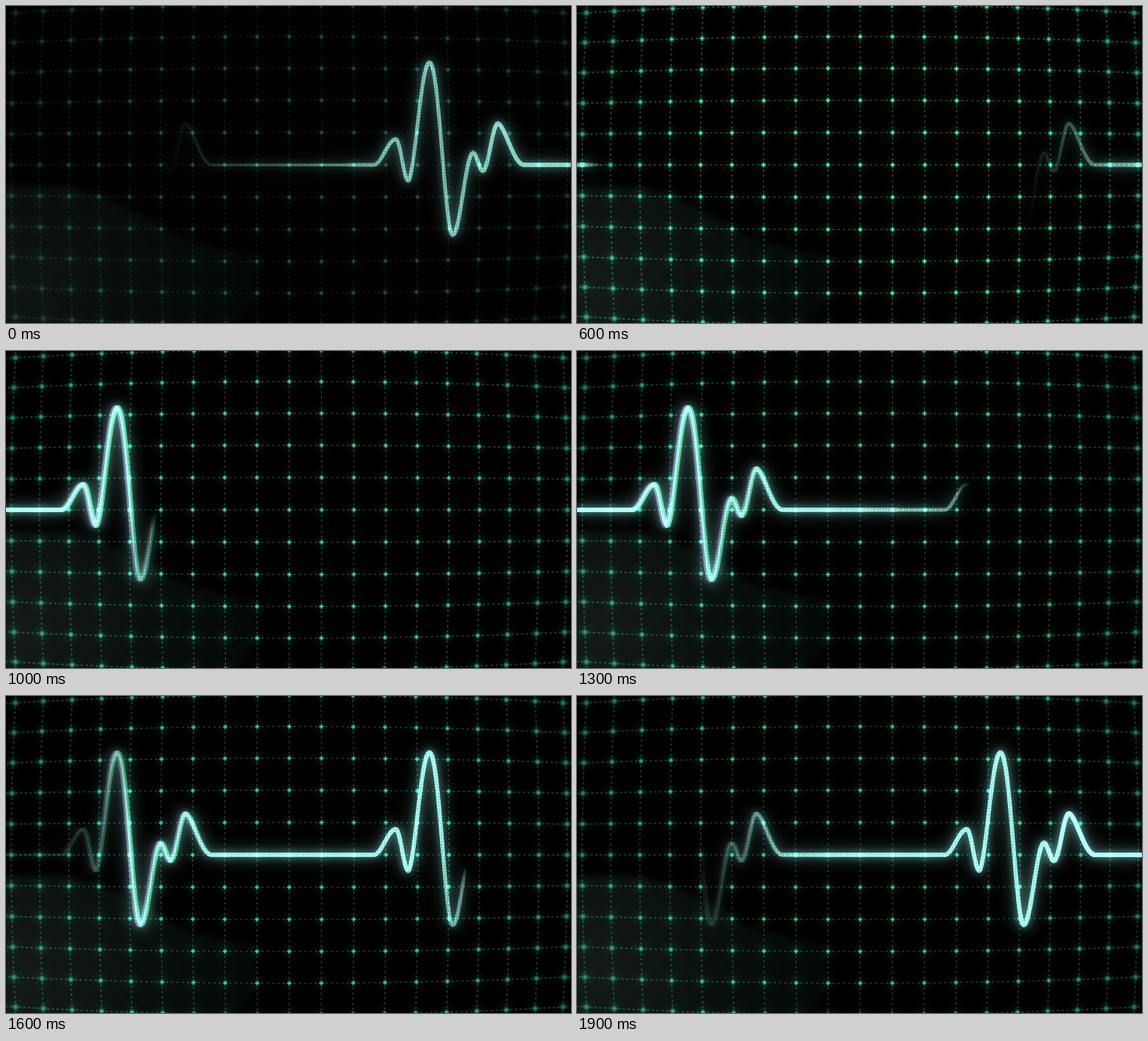
Animation, 750 px wide and 421 px high, one loop 2 s. Source, as an HTML page with a canvas:

```html
<!DOCTYPE html>
<html lang="en">
<head>
<meta charset="utf-8">
<title>Heartbeat monitor</title>
<style>
html, body { margin: 0; width: 100%; height: 100%; overflow: hidden; background: #000; }
canvas { display: block; width: 750px; height: 421px; }
</style>
</head>
<body>
<canvas id="stage" width="750" height="421"></canvas>
<script>
const W = 750, H = 421, CX = 376, CY = 211;
const LOOP = 2000, STEP = 100;
const clamp = (v, a = 0, b = 1) => Math.min(b, Math.max(a, v));

function layer() {
  const c = document.createElement('canvas');
  c.width = W;
  c.height = H;
  return c.getContext('2d');
}

// Linear interpolation through [time, value] pairs
function keyed(keys, t) {
  for (let i = 1; i < keys.length; i++) {
    const [t0, v0] = keys[i - 1], [t1, v1] = keys[i];
    if (t <= t1) return v0 + (v1 - v0) * clamp((t - t0) / (t1 - t0));
  }
  return keys[keys.length - 1][1];
}

// ---- Grid seen through a curved screen ----
const CELL = 43, BULGE = 3.1e-7;

function bend(n, m) {
  const u = n * CELL, v = m * CELL, f = 1 - BULGE * (u * u + v * v);
  return [CX + u * f, CY + v * f];
}

const softness = (x, y) => clamp((Math.hypot(x - CX, y - CY) - 190) / 210);

function spot(g, x, y, r, rgb, a) {
  const fill = g.createRadialGradient(x, y, 0, x, y, r);
  fill.addColorStop(0, `rgba(${rgb},${a})`);
  fill.addColorStop(0.4, `rgba(${rgb},${a * 0.7})`);
  fill.addColorStop(1, `rgba(${rgb},0)`);
  g.fillStyle = fill;
  g.fillRect(x - r, y - r, 2 * r, 2 * r);
}

function dash(g, n, m, vertical) {
  const [x, y] = bend(n, m), e = softness(x, y);
  const long = 3 + e * 0.6, wide = 1.5 + e * 1.1;
  g.fillStyle = `rgba(28,125,98,${0.78 - 0.3 * e})`;
  g.beginPath();
  g.ellipse(x, y, (vertical ? wide : long) / 2, (vertical ? long : wide) / 2, 0, 0, 7);
  g.fill();
}

function node(g, n, m) {
  const [x, y] = bend(n, m), e = softness(x, y);
  spot(g, x, y, 15, '16,110,84', 0.15);
  g.fillStyle = `rgba(36,190,145,${0.55 * (1 - e)})`;
  g.fillRect(x - 3.5, y - 0.7, 7, 1.4);
  g.fillRect(x - 0.7, y - 4, 1.4, 8);
  spot(g, x, y, 3.6 + 1.6 * e, '44,226,170', 0.88 - 0.18 * e);
}

function makeGrid() {
  const g = layer(), parts = 6;
  g.globalCompositeOperation = 'lighter';
  for (let n = -10; n <= 10; n++) {
    for (let m = -6; m <= 6; m++) {
      for (let k = 1; k < parts; k++) {
        dash(g, n + k / parts, m, false);
        dash(g, n, m + k / parts, true);
      }
      node(g, n, m);
    }
  }
  return g.canvas;
}

// ---- Faint reflection at the lower left ----
function makeHaze() {
  const g = layer();
  const fill = g.createRadialGradient(20, 370, 20, 20, 370, 340);
  fill.addColorStop(0, 'rgb(18,25,24)');
  fill.addColorStop(0.4, 'rgb(10,17,16)');
  fill.addColorStop(0.8, 'rgb(4,10,9)');
  fill.addColorStop(1, 'rgb(2,6,6)');
  const edge = [[0, 238], [85, 240], [130, 254], [190, 282], [215, 302],
    [285, 322], [335, 332], [332, 392], [295, 421], [0, 421]];
  g.filter = 'blur(5px)';
  g.fillStyle = fill;
  g.beginPath();
  edge.forEach(([x, y]) => g.lineTo(x || -20, y === H ? H + 20 : y));
  g.fill();
  return g.canvas;
}

// ---- Heartbeat curve: turning points as x, y, ease bias ----
const beat = [[73, 211, 1], [102.5, 177, 1], [119, 232, 1], [147, 75, 0.88], [178, 304, 1.1],
  [205, 195, 1], [218, 219, 1], [238, 156, 1], [273, 211, 0.84]];
const turns = [[-10, 211, 1], ...beat, ...beat.map(([x, y, b]) => [x + 415, y, b]), [760, 211, 1]];

function waveY(x) {
  const i = turns.findIndex(p => p[0] >= x);
  if (i < 1) return 211;
  const [x0, y0] = turns[i - 1], [x1, y1, bias] = turns[i];
  const t = Math.pow((x - x0) / (x1 - x0), bias);
  return y0 + (y1 - y0) * (1 - Math.cos(Math.PI * t)) / 2;
}

const trace = [];
for (let x = -6, s = -6; x <= 756; x += 0.25) {
  const y = waveY(x), last = trace[trace.length - 1];
  if (last) s += Math.hypot(x - last.x, y - last.y);
  trace.push({ x, y, s });
}
const lengthAt = x => trace.find(p => p.x >= x).s;

// ---- Sweep: the beam runs along the curve at an even pace ----
const PACE = 1.57, TAIL = 1680, FADE = 500;
const headKeys = [[600, 30], [1000, 197], [1300, 519], [1600, 610]].map(([t, x]) => [t, lengthAt(x)]);
const headStart = headKeys[0], headEnd = headKeys[3];

function headAt(t) {
  if (t < headStart[0]) return headStart[1] - PACE * (headStart[0] - t);
  if (t > headEnd[0]) return headEnd[1] + PACE * (t - headEnd[0]);
  return keyed(headKeys, t);
}

function glowAt(s, head, falloff) {
  const d = head - s;
  if (d <= 0 || d >= TAIL) return 0;
  const rise = (0.5 + 0.5 * clamp(d / 200)) * clamp(0.2 + d / 25);
  return rise * Math.pow(clamp((TAIL - d) / FADE), falloff);
}

// The picture starts dim and warms up
const gridKeys = [[0, 0.34], [300, 0.82], [600, 1], [1000, 0.86], [1900, 0.8]];
const beamKeys = [[0, 0.76], [300, 0.96], [600, 1]];
const falloffKeys = [[0, 2.2], [300, 1.7], [600, 1.6], [1000, 1.25]];

const pen = layer();
pen.lineCap = 'round';

function paintTrace(t, rgb, side) {
  const heads = [headAt(t), headAt(t + LOOP)];
  const beam = keyed(beamKeys, t), falloff = keyed(falloffKeys, t);
  pen.globalCompositeOperation = 'source-over';
  pen.fillStyle = '#000';
  pen.fillRect(0, 0, W, H);
  pen.globalCompositeOperation = 'lighten';
  for (let i = 2; i < trace.length; i += 2) {
    const a = trace[i - 2], b = trace[i];
    const k = beam * Math.max(...heads.map(head => glowAt(b.s, head, falloff)));
    if (k < 0.01) continue;
    const shift = side * 1.4 * clamp((320 - b.x) / 110);
    pen.strokeStyle = `rgb(${rgb.map(c => Math.round(c * k)).join()})`;
    pen.lineWidth = 2.8 + 2.5 * k + softness(b.x, b.y);
    pen.beginPath();
    pen.moveTo(a.x + shift, a.y);
    pen.lineTo(b.x + shift, b.y);
    pen.stroke();
  }
  // Screen pixels show through where the picture is sharp
  pen.globalCompositeOperation = 'source-over';
  pen.fillStyle = 'rgba(0,0,0,0.2)';
  for (let x = 170; x < 640; x += 4) pen.fillRect(x, 0, 1, H);
  for (let y = 1; y < H; y += 4) pen.fillRect(170, y, 470, 1);
}

const ctx = document.getElementById('stage').getContext('2d');
const grid = makeGrid(), haze = makeHaze();
const passes = [[[80, 56, 92], -1], [[34, 128, 80], 1]];
const blooms = [[11, 1], [4, 0.6], [0.6, 1]];

function draw(t) {
  ctx.globalCompositeOperation = 'source-over';
  ctx.fillStyle = '#000';
  ctx.fillRect(0, 0, W, H);
  ctx.globalCompositeOperation = 'lighter';
  ctx.globalAlpha = keyed(beamKeys, t);
  ctx.drawImage(haze, 0, 0);
  ctx.globalAlpha = keyed(gridKeys, t);
  ctx.drawImage(grid, 0, 0);
  for (const [rgb, side] of passes) {
    paintTrace(t, rgb, side);
    for (const [blur, alpha] of blooms) {
      ctx.filter = `blur(${blur}px)`;
      ctx.globalAlpha = alpha;
      ctx.drawImage(pen.canvas, 0, 0);
    }
    ctx.filter = 'none';
  }
  ctx.globalAlpha = 1;
}

let shown = -1;
const begin = performance.now();
function tick() {
  const step = Math.floor(((performance.now() - begin) % LOOP) / STEP);
  if (step !== shown) {
    shown = step;
    draw(step * STEP);
  }
  requestAnimationFrame(tick);
}
tick();
</script>
</body>
</html>
```
